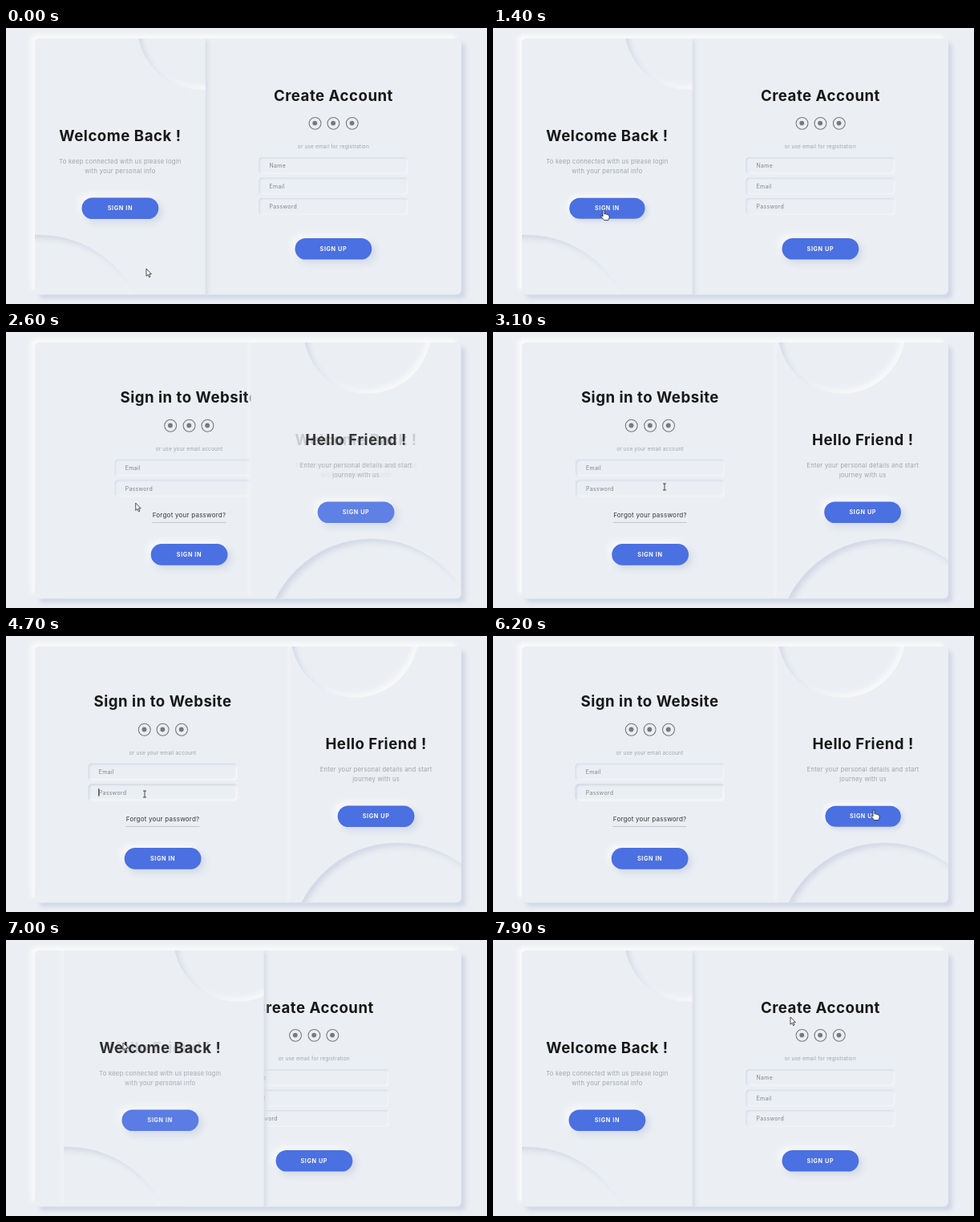
Animation of 600 by 344 pixels, one loop 8000 ms. Source, as an HTML page:

```html
<!DOCTYPE html>
<html lang="en">
<head>
<meta charset="utf-8">
<title>Sign in and sign up</title>
<style>
  :root { --bg: #ebeef3; --dark: #d2d8e6; --light: #f9f9f9; --grey: #a0a5a8; }
  * { box-sizing: border-box; }
  html, body { margin: 0; width: 100%; height: 100%; overflow: hidden; background: var(--bg); }
  body { position: relative; font-family: Inter, sans-serif; }
  main, main * { position: absolute; }
  main {
    left: 35.7px; top: 12.6px; width: 1000px; height: 600px;
    transform: scale(.532); transform-origin: 0 0;
    overflow: hidden; border-radius: 12px; background: var(--bg);
    box-shadow: 10px 10px 10px var(--dark), -10px -10px 10px var(--light);
  }
  .form { width: 600px; height: 100%; background: var(--bg); }
  #panel {
    top: 0; height: 100%; z-index: 3; overflow: hidden; background: var(--bg);
    box-shadow: 4px 4px 10px var(--dark), -4px -4px 10px var(--light);
  }
  .circle {
    border-radius: 50%;
    box-shadow: inset 8px 8px 12px var(--dark), inset -8px -8px 12px var(--light);
  }
  #big { width: 500px; height: 500px; top: 460px; }
  #small { width: 300px; height: 300px; top: -180px; }
  .message { top: 0; width: 400px; height: 100%; }

  /* each line of text is centred on its top value */
  h2, p { left: 0; width: 100%; margin: 0; line-height: 0; text-align: center; white-space: nowrap; }
  h2 { font-size: 35px; font-weight: 700; letter-spacing: .95px; color: #181818; }
  p { font-size: 14.3px; letter-spacing: .5px; color: var(--grey); }
  .hint { font-size: 12.2px; letter-spacing: .32px; }
  .link { font-size: 15.1px; letter-spacing: .4px; color: #383838; }
  .rule { left: 213px; width: 173px; height: 1px; background: var(--grey); }
  .button {
    left: calc(50% - 90px); width: 180px; height: 50px; border-radius: 25px;
    background: #4b70e2; color: #f9f9f9; text-align: center;
    font-size: 13.6px; font-weight: 700; line-height: 50px; letter-spacing: 1.15px;
    box-shadow: 8px 8px 16px var(--dark), -8px -8px 16px var(--light);
  }
  .field {
    left: 125px; width: 350px; height: 40px; padding-left: 25px; border-radius: 8px;
    font-size: 13.1px; line-height: 40px; letter-spacing: .5px; color: #828486;
    --d: 2px;
    box-shadow: inset var(--d) var(--d) 4px var(--dark),
      inset calc(-1 * var(--d)) calc(-1 * var(--d)) 4px var(--light);
  }
  .caret { left: 24px; top: 11px; width: 2px; height: 18px; background: #222; visibility: hidden; }
  .icon { width: 30px; height: 30px; border: 2.5px solid #77797b; border-radius: 50%; }
  .icon::after {
    content: ""; position: absolute; left: 7px; top: 7px; width: 11px; height: 11px;
    border-radius: 50%; background: #77797b;
  }
  .icon:nth-of-type(1) { left: 241.5px; }
  .icon:nth-of-type(2) { left: 285px; }
  .icon:nth-of-type(3) { left: 328.5px; }
  #cursor { position: absolute; left: 0; top: 0; overflow: visible; z-index: 9; }
  #cursor path { fill: #fff; stroke: #222; stroke-width: .8; stroke-linejoin: round; }
</style>
</head>
<body>
<main>
  <section class="form" id="signUp">
    <i class="icon" style="top:184px"></i><i class="icon" style="top:184px"></i><i class="icon" style="top:184px"></i>
    <h2 style="top:132.5px">Create Account</h2>
    <p class="hint" style="top:253.5px">or use email for registration</p>
    <div class="field" style="top:278px">Name</div>
    <div class="field" style="top:326px">Email</div>
    <div class="field" style="top:374px">Password</div>
    <div class="button" style="top:468px">SIGN UP</div>
  </section>
  <section class="form" id="signIn">
    <i class="icon" style="top:180px"></i><i class="icon" style="top:180px"></i><i class="icon" style="top:180px"></i>
    <h2 style="top:128px">Sign in to Website</h2>
    <p class="hint" style="top:249.5px">or use your email account</p>
    <div class="field" id="email" style="top:274px">Email<b class="caret"></b></div>
    <div class="field" id="password" style="top:322px">Password<b class="caret"></b></div>
    <p class="link" style="top:405px">Forgot your password?</p>
    <div class="rule" style="top:421px"></div>
    <div class="button" style="top:472px">SIGN IN</div>
  </section>
  <section id="panel">
    <div class="circle" id="big"></div>
    <div class="circle" id="small"></div>
    <div class="message" id="welcome">
      <h2 style="top:227px">Welcome Back !</h2>
      <p style="top:289px">To keep connected with us please login</p>
      <p style="top:311.4px">with your personal info</p>
      <div class="button" style="top:373px">SIGN IN</div>
    </div>
    <div class="message" id="hello">
      <h2 style="top:227px">Hello Friend !</h2>
      <p style="top:289px">Enter your personal details and start</p>
      <p style="top:311.4px">journey with us</p>
      <div class="button" style="top:373px">SIGN UP</div>
    </div>
  </section>
</main>
<svg id="cursor" width="1" height="1"><path/></svg>
<script>
const LOOP = 8000, SLIDE = 1250, GO = 1917, BACK = 6248;
const EMAIL = 3750, PASSWORD = 4550, BLUR = 6150;
const $ = id => document.getElementById(id);
const clamp = x => Math.min(1, Math.max(0, x));
const ramp = (t, start, length = 250) => clamp((t - start) / length);
const px = n => n + 'px';

// cubic-bezier(.25, .1, .25, 1)
function ease(x) {
  if (x <= 0 || x >= 1) return clamp(x);
  let lo = 0, hi = 1, u;
  for (let i = 0; i < 24; i++) {
    u = (lo + hi) / 2;
    if (.75 * u * (1 - u) + u ** 3 < x) lo = u; else hi = u;
  }
  return .3 * u * (1 - u) ** 2 + 3 * u * u * (1 - u) + u ** 3;
}

const swell = p => p < .5 ? ease(clamp((p - .1) / .2)) : 1 - ease((p - .5) / .5);

function pose(t) {
  const out = ramp(t, GO, SLIDE), back = ramp(t, BACK, SLIDE);
  const k = ease(out) - ease(back);
  const width = 400 + 100 * (swell(out) + swell(back));
  return { k, width, left: 600 * k, middle: 600 * k + width / 2 };
}

const shapes = {
  arrow: 'M0 0V9.2L2.1 7.3 3.5 10.6 5 10 3.6 6.7H6.4Z',
  beam: 'M-2-4H2M0-4V4M-2 4H2',
  hand: 'M-1 1Q-1 0 0 0T1 1V5Q3 4 3.5 5.5 5 4.8 5.5 6.2 7 5.8 7 7V9.5L6 12.5H.5L-3 8.2Q-3.6 6.5-2.2 6.6L-1 8Z'
};

// time, x, y, shape from then on
const track = [
  [0, 175, 300, 'arrow'], [350, 175, 300, 'arrow'], [1100, 146, 237, 'hand'],
  [1350, 138, 227, 'hand'], [1990, 138, 227, 'arrow'], [2400, 138, 227, 'arrow'],
  [2900, 205, 188, 'beam'], [3100, 214, 193, 'beam'], [3550, 190, 171, 'beam'],
  [4150, 190, 171, 'beam'], [4500, 173, 197, 'beam'], [5300, 173, 197, 'arrow'],
  [5900, 464, 221, 'hand'], [6150, 475, 217, 'hand'], [6330, 475, 217, 'arrow'],
  [6950, 146, 128, 'arrow'], [7150, 146, 128, 'arrow'], [7800, 371, 96, 'arrow'],
  [LOOP, 371, 96, 'arrow']
];

function drawCursor(t) {
  const i = track.findIndex(key => key[0] > t) - 1;
  const [t0, x0, y0, shape] = track[i], [t1, x1, y1] = track[i + 1];
  const u = (t - t0) / (t1 - t0), s = u * u * (3 - 2 * u);
  const path = $('cursor').firstChild;
  path.setAttribute('d', shapes[shape]);
  path.setAttribute('transform', `translate(${x0 + (x1 - x0) * s} ${y0 + (y1 - y0) * s})`);
}

function drawFocus(id, t, from, to) {
  const field = $(id), on = t >= from && t < to;
  field.style.setProperty('--d', px(2 + 2 * (ramp(t, from) - ramp(t, to))));
  field.lastChild.style.visibility = on && (t - from) % 1000 < 500 ? 'visible' : 'hidden';
}

function draw(t) {
  const { k, width, left } = pose(t);
  const panel = $('panel').style;
  panel.left = px(left);
  panel.width = px(width);
  $('big').style.left = px(-.6 * width * (1 - k) + (width - 400) * k);
  $('small').style.left = px(.6 * width * (1 - k) + (width - 400) * k);

  // the text runs slightly ahead of the panel on the way back
  const middle = pose(t > BACK ? t + 18 : t).middle;
  const hover = ramp(t, 1100) - ramp(t, 2000) + ramp(t, 5900) - ramp(t, 6350);
  const d = 8 - 2 * hover, blur = 16 - 6 * hover;
  for (const [id, opacity] of [['welcome', 1 - k], ['hello', k]]) {
    const box = $(id), button = box.lastElementChild.style;
    box.style.left = px(middle - 200 - left);
    box.style.opacity = opacity;
    button.transform = `scale(${1 - .015 * hover})`;
    button.boxShadow = `${d}px ${d}px ${blur}px var(--dark), ${-d}px ${-d}px ${blur}px var(--light)`;
  }

  $('signUp').style.left = $('signIn').style.left = px(400 * (1 - k));
  $('signUp').style.zIndex = 1;
  $('signIn').style.zIndex = k >= .5 ? 2 : 0;
  drawFocus('email', t, EMAIL, PASSWORD);
  drawFocus('password', t, PASSWORD, BLUR);
  drawCursor(t);
}

const begin = performance.now();
function tick() {
  draw((performance.now() - begin) % LOOP);
  requestAnimationFrame(tick);
}
tick();
</script>
</body>
</html>
```
